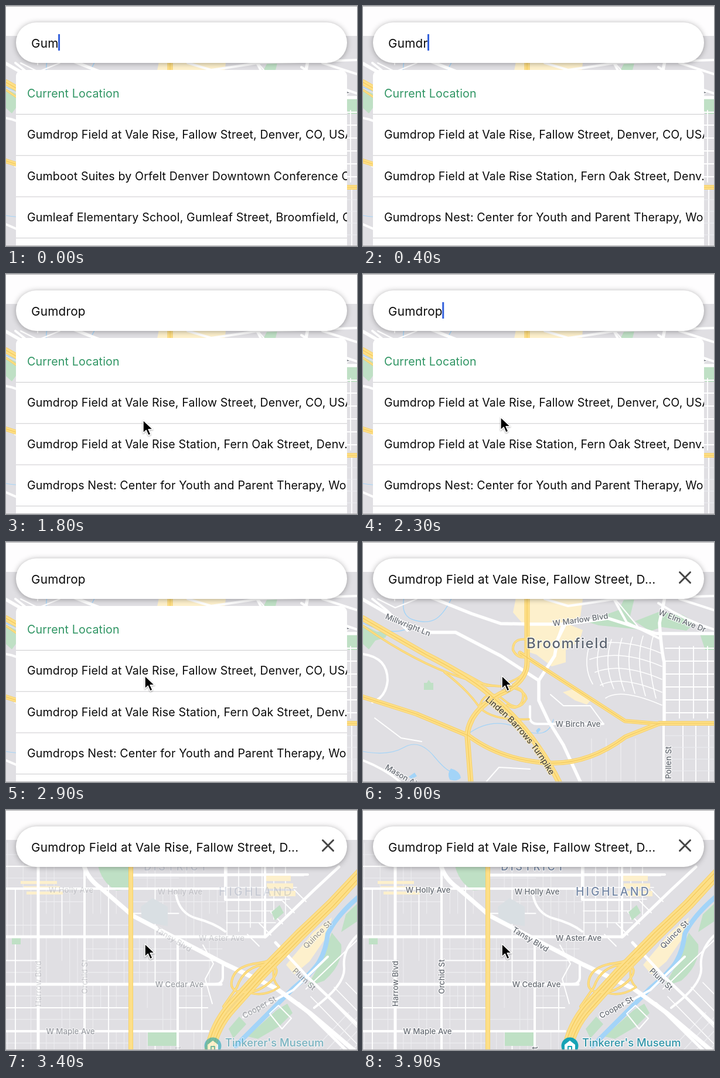
Recreate the animation shown at these times as an HTML page. Size 599 by 409 pixels, loop 4000 ms.

```html
<!DOCTYPE html>
<html lang="en">
<head>
<meta charset="utf-8">
<title>Place search</title>
<style>
html, body { margin: 0; width: 100%; height: 100%; overflow: hidden; background: #fff; }
svg { display: block; }
.ui { font-family: Inter, sans-serif; fill: #0a0a0a; }
.map text {
  font: 500 13.3px Inter, sans-serif; fill: #666b73; text-anchor: middle;
  paint-order: stroke; stroke: #fff; stroke-opacity: .8; stroke-width: 2.5px; stroke-linejoin: round;
}
.map path { fill: none; stroke-linecap: round; stroke-linejoin: round; }
.map path.area { stroke: none; }
</style>
</head>
<body>
<svg id="stage" width="599" height="409" viewBox="0 0 599 409" xmlns="http://www.w3.org/2000/svg">
  <defs>
    <clipPath id="mapClip"><rect y="51" width="599" height="358"/></clipPath>
    <clipPath id="listClip"><rect x="17" y="109" width="565" height="310" rx="11"/></clipPath>
    <path id="pike" d="M211 266 Q288 326 331 410"/>
  </defs>
  <rect width="599" height="409" fill="#fefdfe"/>
  <g class="map" clip-path="url(#mapClip)">
    <g id="suburb"></g>
    <g id="city"></g>
  </g>
  <g class="ui">
    <g id="list" clip-path="url(#listClip)" font-size="19.6" letter-spacing=".15"></g>
    <rect x="17" y="28" width="565" height="69" rx="34.5" fill="#fff" style="filter:drop-shadow(0 1px 5px rgba(0,0,0,.32))"/>
    <text id="query" x="43" y="70.5" font-size="20.7" letter-spacing=".25"></text>
    <rect id="caret" y="48" width="3" height="28" fill="#3461dc"/>
    <path id="clear" d="M540.5 51.5l18 18m0-18l-18 18" stroke="#444" stroke-width="3" stroke-linecap="round"/>
  </g>
  <path d="M0 .5H599" stroke="#aaa9ab"/>
  <path d="M0 408.5H599" stroke="#b4b3b6"/>
  <path id="pointer" d="M0 0V22L5.2 17.2L9 26L13 24.3L9.2 15.8H16.6Z" fill="#000" stroke="#fff" stroke-width="1.5" stroke-linejoin="round" style="filter:drop-shadow(0 1px 1px rgba(0,0,0,.35))"/>
</svg>
<script>
const $ = id => document.getElementById(id);
const LOOP = 4000, STEP = 100;
const LAND = '#e0dfe3', CREAM = '#fdf0cc', GREEN = '#bfe0c5', WATER = '#a3d4f8', FAINT = '#eeeef1';
const WORD = 'Gumdrop';
const PLACE = 'Gumdrop Field at Vale Rise';
const FIRST = PLACE + ', Fallow Street, Denver, CO, USA';
const CHOSEN = PLACE + ', Fallow Street, D...';
const EARLY = [FIRST,
  'Gumboot Suites by Orfelt Denver Downtown Conference C...',
  'Gumleaf Elementary School, Gumleaf Street, Broomfield, CO'];
const LATE = [FIRST,
  PLACE + ' Station, Fern Oak Street, Denv...',
  'Gumdrops Nest: Center for Youth and Parent Therapy, Wo...'];

const line = (d, w, c = '#fff') => `<path d="${d}" stroke="${c}" stroke-width="${w}"/>`;
const area = (d, c) => `<path class="area" d="${d}" style="fill:${c}"/>`;
const roads = (w, ...ds) => ds.map(d => line(d, w)).join('');
const label = (s, x, y, turn = 0, css = '') =>
  `<text transform="translate(${x} ${y}) rotate(${turn})" dy="5" style="${css}">${s}</text>`;
const range = (n, f) => Array.from({ length: n }, (_, i) => f(i)).join('');

let seed = 7;
const random = () => (seed = seed * 16807 % 2147483647) / 2147483647;

// Yellow roads: all casings first so that junctions merge
function highways(list) {
  return list.map(([d, w]) => line(d, w, '#f7d067')).join('') +
    list.map(([d, w]) => line(d, w - 1.8, '#fddf88')).join('') +
    list.map(([d, w, twin]) => twin ? line(d, 1.2, '#f3ca5c') : '').join('');
}

function drawSuburb() {
  const blocks = range(7, i => line(`M${388 + i * 18} ${170 - i * 2}q-14 42 4 ${72 + i * 6}`, 1.6)) +
    range(5, i => line(`M${378 + i * 9} ${178 + i * 22}Q440 ${160 + i * 22} 510 ${190 + i * 22}`, 1.6)) +
    range(6, i => line(`M516 ${181 + i * 22}H599`, 2)) +
    range(3, i => line(`M${540 + i * 24} 178V300M${546 + i * 22} 313V409`, 1.8)) +
    range(4, i => line(`M516 ${330 + i * 20}H599M${390 + i * 25} 335V409`, 1.2, FAINT));
  return `<rect y="51" width="599" height="358" fill="${LAND}"/>` +
    area('M262 90H376L371 127L350 140L375 150L370 168L346 184V205L322 212L296 192L278 186L275 142L256 120Z', CREAM) +
    area('M341 256L361 250L392 266L382 277L362 270Z', CREAM) +
    area('M376 134L408 126L436 116L446 97H463L456 126L470 149L432 145L402 142Z', GREEN) +
    area('M464 135L505 119L545 124L568 137L552 151L510 145L490 152Z', GREEN) +
    area('M575 157H599V184H584Z', GREEN) +
    area('M0 141L24 153L45 151L38 163L21 168L10 183L0 174Z', GREEN) +
    area('M104 240H109L112 235L116 240H120V252H104Z', GREEN) +
    line('M71 90Q62 126 87 133T126 130T153 92M0 138Q45 160 76 148', 1.4, WATER) +
    line('M0 357Q44 365 70 350T121 365T154 391M178 328Q220 296 268 318T325 302', 1.2, WATER) +
    area('M150 386Q165 390 167 402Q160 409 148 405Q143 394 150 386Z', WATER) +
    area('M295 322Q301 313 303 320L298 326Z', WATER) +
    area('M78 400L88 393L92 399L83 404Z', WATER) +
    blocks +
    roads(2, 'M25 97L55 112L92 97', 'M54 51V100', 'M430 97L470 145', 'M330 168L340 140',
      'M320 260L342 279H388L410 309', 'M210 409L232 384L285 387', 'M20 300L65 334L100 340') +
    roads(4, 'M0 191Q42 197 42 236Q39 265 16 273', 'M16 97L40 116L76 151', 'M285 280V301Q287 310 297 310H410',
      'M504 104Q548 133 599 149', 'M540 97L599 116', 'M513 310V409', 'M0 372Q38 387 64 409',
      'M310 97L350 109Q400 102 430 97L599 92', 'M428 97L450 137L505 164') +
    roads(5.5, 'M105 90L185 122L235 139L286 140H345L418 130L500 156H599', 'M0 98L66 136L116 154H158L235 194L300 236',
      'M300 236L327 194L332 166L345 140', 'M300 236V270L316 304L342 346L371 409',
      'M524 51L506 138Q509 184 514 205V310') +
    highways([
      ['M0 143Q90 206 168 231T248 239Q277 230 282 207', 3.5],
      ['M70 171Q165 218 211 245Q276 244 279 267Q267 291 244 272Q218 249 203 270L181 321', 3.5],
      ['M281 166Q255 163 256 184Q264 201 283 195', 4],
      ['M246 246Q282 246 271 273Q262 288 246 278', 4],
      ['M139 222Q177 251 196 278T283 302', 3.5],
      ['M0 264L91 293L180 330Q232 369 306 376T448 332L506 309H599', 8, 1],
      ['M280 90V203Q281 239 234 259Q178 290 178 332L184 409', 9, 1],
      ['M268 189L351 243L447 305L506 310', 7, 1],
      ['M0 130L108 192Q187 232 221 264Q292 323 336 412', 10, 1]
    ]) +
    label('Millwright Ln', 77, 141, 22) + label('W Marlow Blvd', 371, 132, -8) +
    label('W Elm Ave Dr', 545, 134, 21) + label('W Birch Ave', 367, 310) +
    label('Pollen St', 521, 376, -90) + label('Mason Ai', 65, 397, 30) +
    label('Broomfield', 349, 176, 0, 'font-size:24px;letter-spacing:1.5px;fill:#5c6470') +
    `<text dy="5" style="text-anchor:start;font-size:14.5px;fill:#4b473f;stroke:#fce9ad"><textPath href="#pike">Linden Barrows Turnpike</textPath></text>`;
}

// Side streets with gaps, finer between the main roads
function sideStreets() {
  const block = 80;
  return range(5, c => range(5, r => {
    const x = -24 + c * 79.5, y = 56 + r * 80.3;
    return range(5, i => random() < .7 ? line(`M${x + (i + 1) * 13.3} ${y}v${block * (random() < .6 ? 1 : .5)}`, 1, FAINT) : '') +
      range(3, i => random() < .8 ? line(`M${x} ${y + (i + 1) * 20}h${block}`, i === 1 ? 2 : 1.2, i === 1 ? '#fff' : FAINT) : '') +
      (random() < .6 ? line(`M${x + 40} ${y}v${block}`, 1.8) : '');
  }));
}

function drawCity() {
  const upper = range(6, i => line(`M${377 + i * 20} 51V${214 - i * 7}`, 1.5) + line(`M376 ${92 + i * 20}H${520 - i * 12}`, 1.5));
  const slant = range(5, i => line(`M${432 + i * 20} ${232 - i * 19}l-20 -20`, 1.8));
  const east = range(6, i => line(`M${525 + i * 22} 409l60 -64`, 1.4, FAINT) + line(`M${520 + i * 20} ${318 - i * 8}l90 92`, 1.5));
  return `<rect y="51" width="599" height="358" fill="${LAND}"/>` +
    sideStreets() + upper +
    area('M376 219L446 217L540 125L604 60V409H345V300Z', LAND) + slant + east +
    area('M230 165L250 150L276 165V198L232 190Z', '#d9dfe3') +
    [0, 1, 2].map(i => area(`M${25 + i * 5} ${121 + i * 9}h62v5h-62Z`, CREAM) +
      area(`M${441 + i * 4} ${112 + i * 13}h45v9h-45Z`, CREAM)).join('') +
    area('M478 264L524 209L556 183L549 213L518 258L492 280Z', CREAM) +
    area('M156 90H211V135L188 137Q162 123 156 90Z', GREEN) +
    area('M453 174L467 162L474 175L459 188Z', GREEN) +
    area('M10 218H25V229H10Z', GREEN) + area('M242 379H291V402H242Z', GREEN) +
    area('M556 209L572 229Q576 263 543 291L514 301L535 263Z', GREEN) +
    area('M580 178L599 160V190L572 208Z', GREEN) +
    area('M462 341L480 330L489 346L466 369L430 390L412 386Z', GREEN) +
    area('M380 373L398 352L410 365L388 389Z', GREEN) +
    line('M604 146Q564 180 549 211Q546 242 531 264Q518 281 490 304L432 362L392 402', 8, WATER) +
    roads(2, 'M450 347L465 333L487 355L471 373Z', 'M512 305L599 222', 'M336 230L354 262L340 288L352 330') +
    roads(4, 'M0 134H375', 'M0 377H345', 'M134 51V409', 'M293 217V409', 'M374 90V153', 'M376 153H470',
      'M290 144Q296 177 326 185T374 207', 'M370 262V286Q369 297 355 297', 'M375 110H515', 'M442 97V217',
      'M599 214Q574 239 577 268T526 337', 'M405 353L490 307L549 250') +
    roads(5, 'M55 51V409', 'M0 216H443L525 137L568 97', 'M0 297H367', 'M213 111H374',
      'M460 226L514 284L599 365', 'M500 330L580 409') +
    roads(7.5, 'M132 90Q137 116 163 134L216 180L300 224L375 263L461 304L520 347L599 414') +
    highways([
      ['M213 51V409', 8],
      ['M493 225Q465 257 430 261T387 285Q378 309 404 311T454 290Q472 268 448 263Q407 264 394 302L371 335', 4],
      ['M460 259Q450 287 466 302Q436 322 407 308', 3.5],
      ['M604 103L552 158L498 209L434 274L380 333Q351 367 343 413', 10, 1],
      ['M604 114L558 164L504 217L440 282L387 341Q359 372 352 413', 10, 1]
    ]) +
    `<g id="late">` +
    label('W Holly Ave', 111, 136) + label('W Holly Ave', 297, 139) + label('W Aster Ave', 368, 218) +
    label('Tansy Blvd', 286, 220, 31) + label('Harrow Blvd', 55, 296, -90) + label('Orchid St', 134, 284, -90) +
    label('DISTRICT', 291, 98, 0, 'font-size:18px;letter-spacing:3.6px;fill:#7687a3') +
    label('HIGHLAND', 427, 141, 0, 'font-size:19.5px;letter-spacing:3.2px;fill:#7487a5') +
    label('Wren St', 293, 403, -90, 'text-anchor:end') + `</g><g id="soon">` +
    label('W Cedar Ave', 296, 297) + label('W Maple Ave', 110, 377) + label('Quince St', 531, 212, -45) +
    label('Plum St', 509, 288, 43) + label('Cooper St', 432, 336, -29) + `</g><g id="spot">` +
    `<circle cx="353" cy="402" r="14.5" fill="#16a3b5"/>` +
    area('M344 400L353 393L362 400V409H344Z', '#fff') + line('M350 409V403H356V409', 2, '#16a3b5') +
    label("Tinkerer's Museum", 374, 398, 0, 'text-anchor:start;font-size:18.3px;fill:#2e94a8') + `</g>`;
}

function drawList() {
  return '<rect x="17" y="109" width="565" height="310" fill="#fff"/>' +
    '<text x="36" y="156" style="fill:#2f9563">Current Location</text>' +
    range(3, i => `<text class="row" x="36" y="${226.4 + i * 70.4}"></text>`) +
    range(4, i => `<path d="M17 ${184.5 + i * 70.3}H582" stroke="#cbcacd"/>`);
}

$('suburb').innerHTML = drawSuburb();
$('city').innerHTML = drawCity();
$('list').innerHTML = drawList();
const rows = document.querySelectorAll('.row');

const clamp = v => Math.max(0, Math.min(1, v));
const show = (id, on) => $(id).setAttribute('opacity', +on);

// Pointer keys: time, x, y
const PATH = [[1300, 226, 320], [1800, 234, 249], [2000, 234, 249], [2400, 235, 243], [2600, 235, 243], [2900, 237, 228]];
function pointerAt(t) {
  const end = PATH.findIndex(k => k[0] > t);
  if (end < 0) return PATH[PATH.length - 1].slice(1);
  if (end === 0) return PATH[0].slice(1);
  const a = PATH[end - 1], b = PATH[end];
  const p = (t - a[0]) / (b[0] - a[0]), e = p * p * (3 - 2 * p);
  return [a[1] + (b[1] - a[1]) * e, a[2] + (b[2] - a[2]) * e];
}

function render(t) {
  const picked = t >= 3000, arrived = t >= 3200;
  const count = 3 + [100, 400, 800, 1100].filter(k => t >= k).length;
  $('query').textContent = picked ? CHOSEN : WORD.slice(0, count);
  if (!picked) {
    $('caret').setAttribute('x', 42.5 + $('query').getComputedTextLength());
    const items = t < 200 ? EARLY : LATE;
    rows.forEach((r, i) => r.textContent = items[i]);
  }
  const blink = t < 2000 ? clamp((1700 - t) / 200) : Math.min(clamp((t - 1900) / 200), clamp((2700 - t) / 200));
  show('caret', picked ? 0 : blink);
  show('list', !picked);
  show('clear', picked);
  show('suburb', !arrived);
  show('city', arrived);
  show('soon', clamp((t - 3150) / 400));
  show('spot', clamp((t - 3170) / 400));
  show('late', clamp((t - 3280) / 500));
  show('pointer', t >= 1300);
  $('pointer').setAttribute('transform', `translate(${pointerAt(t)})`);
}

const start = performance.now();
function tick(now) {
  const t = Math.max(0, now - start) % LOOP;
  render(Math.floor(t / STEP) * STEP);
  requestAnimationFrame(tick);
}
render(0);
requestAnimationFrame(tick);
</script>
</body>
</html>
```
